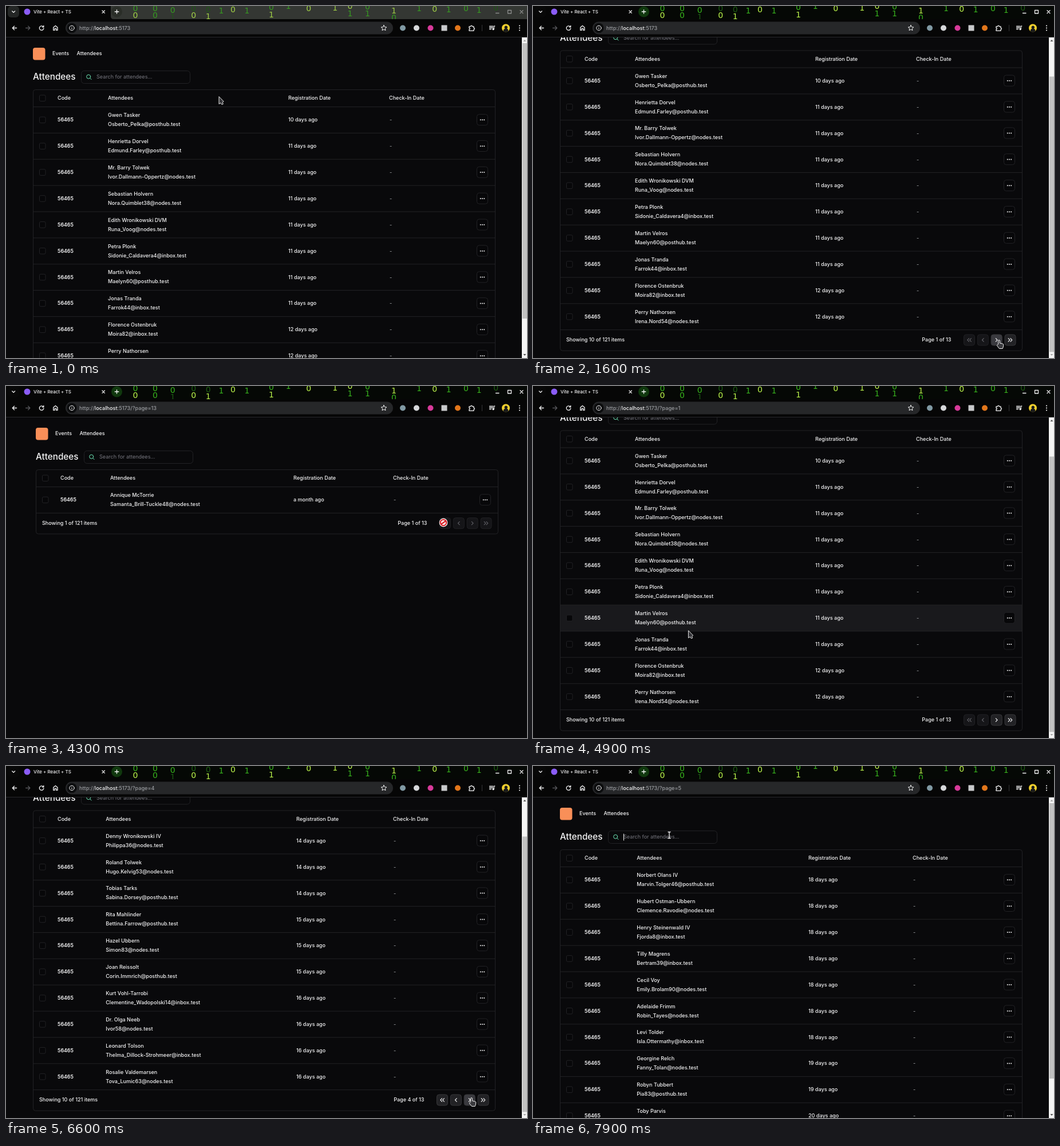
Write an HTML page that moves like this. It is 910 by 616 pixels and loops after 8000 ms.

```html
<!DOCTYPE html>
<html lang="en">
<head>
<meta charset="utf-8">
<title>Attendees</title>
<style>
  html, body { margin: 0; width: 100%; height: 100%; overflow: hidden; background: #09090b; }
  svg { display: block; width: 910px; height: 616px; font: 500 9.05px Inter, sans-serif; }
  text { fill: #f4f4f5; white-space: pre; }
  .line { fill: none; stroke: #f4f4f5; stroke-width: 1.3; stroke-linecap: round; stroke-linejoin: round; }
  .thin { stroke-width: 1; }
  .rule { stroke: #222225; fill: none; }
  .box { fill: #070709; stroke: #222225; }
  .muted { fill: #77777f; }
  .grey { fill: #9a9ca0; }
  .code { font-weight: 600; font-size: 8.8px; }
  .btn rect { fill: #222225; stroke: #38383b; }
  .btn.hot rect { fill: #3a3a3f; }
  .btn.off rect { fill: #151518; stroke: #212124; }
  .btn.off path { stroke: #626268; }
  #strip { fill: #050805; }
  #rain { font: 400 14px "DejaVu Sans", sans-serif; text-anchor: middle; }
  .idle #strip { fill: #343733; }
  .idle #rain { opacity: .8; }
  .idle #win { opacity: .45; }
  .idle #plus circle { fill: #2a2e28; }
  .idle #menu { fill: #242625; }
  #plus circle { fill: #10380e; }
  #menu { fill: #080808; }
</style>
</head>
<body>
<svg viewBox="0 0 910 616" id="stage">
  <rect width="910" height="616" fill="#09090b"/>
  <g id="shell">
    <rect x="47" y="73" width="21.5" height="21.5" rx="4" fill="#f98f58"/>
    <text x="81" y="86.4">Events</text>
    <text x="123.5" y="86.4">Attendees</text>
    <text x="47" y="129.4" font-size="15.3">Attendees</text>
    <rect class="rule" x="131.5" y="113.5" width="190" height="22" rx="5"/>
    <g class="line thin" style="stroke:#6ee7b7"><circle cx="144.2" cy="123.7" r="3.5"/><path d="M146.9 126.4l2.2 2.2"/></g>
    <text class="muted" x="158" y="127.2" font-weight="400">Search for attendees...</text>
    <path id="caret" d="M158.5 118.5v12" stroke="#f4f4f5"/>
    <rect id="hover" x="47.5" width="807" height="45.87" fill="#19191c"/>
    <g id="tables"></g>
    <g id="pager"></g>
  </g>
  <g id="bar">
    <rect x="901" y="55" width="9" height="561" fill="#f4f4f4"/>
    <rect id="thumb" x="902" width="8" height="482" fill="#c1c1c1"/>
    <path id="up" d="M903.5 62h5l-2.5-3z"/>
    <path id="down" d="M903.5 609h5l-2.5 3z"/>
  </g>

  <rect id="strip" width="910" height="24"/>
  <g id="rain"></g>
  <path d="M0 23.5V0H183V18q0 5 5 5H910V54.5H0z" fill="#060606"/>
  <rect y="54" width="910" height="1" fill="#29292b"/>
  <rect id="menu" x="3" width="20" height="20" rx="6"/>
  <path class="line" d="M10.8 9l2.4 2.4L15.6 9"/>
  <circle cx="37" cy="10" r="5.5" fill="#8b5cf6"/>
  <text x="48" y="13" font-size="7.95">Vite + React + TS</text>
  <path class="line" d="M168 8l4.4 4.4m0-4.4L168 12.4"/>
  <g id="plus"><circle cx="193.5" cy="10" r="9.5"/><path class="line" d="M190.2 10h6.6M193.5 6.7v6.6"/></g>
  <path id="win" class="line" d="M855.5 12.5h5.5M876.5 7.5h6v5.5h-6zM898 7.8l5 5m0-5l-5 5"/>

  <g class="line">
    <path d="M18.6 38.5H11.5M14.5 35.3l-3.2 3.2 3.2 3.2"/>
    <path style="stroke:#55565a" d="M34.6 38.5h7M38.7 35.3l3.2 3.2-3.2 3.2"/>
    <path d="M65.2 36.4a3.8 3.8 0 1 0 .7 2.6M65.8 34.4v2.4h-2.4"/>
    <path d="M82.8 37.6l3.6-3 3.6 3v4.8h-2.3v-3h-2.6v3h-2.3z"/>
  </g>
  <rect x="104" y="27.5" width="572" height="22" rx="11" fill="#262729"/>
  <circle cx="115" cy="38.5" r="8.7" fill="#0c0d0e"/>
  <g class="line thin"><circle cx="115" cy="38.5" r="4.2"/><path d="M115 38.3v2M115 36.4v.1"/></g>
  <text x="128" y="41.7" font-size="9.15" class="grey">http://<tspan fill="#f4f4f5">localhost</tspan>:5173<tspan id="query"></tspan></text>
  <path class="line thin" d="M660 33.6l1.4 3.1 3.4.4-2.5 2.3.7 3.3-3-1.7-3 1.7.7-3.3-2.5-2.3 3.4-.4z"/>
  <circle cx="693" cy="38.5" r="5" fill="#8099a3"/>
  <circle cx="717" cy="38.5" r="5" fill="#d6d8da"/>
  <circle cx="741.5" cy="38.5" r="5" fill="#d83a9a"/>
  <rect x="760.5" y="33.5" width="10" height="10" fill="#c9cacc"/>
  <circle cx="789" cy="38.5" r="5" fill="#e2761b"/>
  <path class="line" d="M809 35.8h2.6a1.4 1.4 0 0 1 2.8 0h2.6v2.5a1.4 1.4 0 0 1 0 2.8v2.2h-8v-2.3a1.3 1.3 0 0 0 0-2.6z"/>
  <path d="M831.5 33v11" stroke="#333437"/>
  <path class="line" d="M844.5 35.5h6M844.5 38h6M844.5 40.5h3M852.3 40.5v-5.4h1.6"/><circle cx="851" cy="40.7" r="1.6" fill="#f4f4f5"/>
  <circle cx="873" cy="38.5" r="7" fill="#f0cf2e"/>
  <path d="M868.6 44q.2-4 3.2-4.6a2.6 2.6 0 1 1 3 0q2.6.7 2.7 4.4a7 7 0 0 1-8.9.2z" fill="#191a1c"/>
  <path d="M897 34.5v8.1" stroke="#f4f4f5" stroke-width="2.2" stroke-linecap="round" stroke-dasharray="0 4"/>

  <g id="cursor">
    <path id="arrow" d="M0 0V13L3 11l2 3 2.3-1-1.2-3L8.2 8.5z" fill="#343438" stroke="#e8e8e8" stroke-linejoin="round"/>
    <path id="hand" d="M-1.4 7V1a1.4 1.4 0 0 1 2.8 0V5l5 1.1q1.6.4 1.4 2l-.6 4-1 2.4H.4L-3.4 9.6q-.5-1.4.6-1.7z" fill="#3a3a3e" stroke="#f2f2f2" stroke-linejoin="round"/>
    <path id="beam" class="line" d="M-2-5.5h1.4L0-5l.6-.5H2M0-5V5M-2 5.5h1.4L0 5l.6.5H2"/>
    <g id="stop"><circle r="7.4" fill="#fff"/><path d="M5.2 0A5.2 5.2 0 1 1-5.2 0 5.2 5.2 0 1 1 5.2 0M-3.8 2.8L3.8-2.8" fill="none" stroke="#d8262c" stroke-width="2.3"/></g>
  </g>
</svg>
<script>
const LOOP = 8000, TICK = 100, TOP = 176.5, ROW = 45.87, MAX = 68.5;
const $ = id => document.getElementById(id);
const label = (x, y, s, attrs = '') => `<text x="${x}" y="${y + 3.3}" ${attrs}>${s}</text>`;
const show = (id, on) => { $(id).style.display = on ? '' : 'none'; };

// Each row: name, mailbox, domain key
const domains = { h: 'posthub.test', y: 'nodes.test', g: 'inbox.test' };
const parse = s => s.trim().split('\n').map(l => l.trim().split('|'));
const rows = {
  1: parse(`Gwen Tasker|Osberto_Pelka|h
    Henrietta Dorvel|Edmund.Farley|h
    Mr. Barry Tolwek|Ivor.Dallmann-Oppertz|y
    Sebastian Holvern|Nora.Quimblet38|y
    Edith Wronikowski DVM|Runa_Voog|y
    Petra Plonk|Sidonie_Caldavera4|g
    Martin Velros|Maelyn60|h
    Jonas Tranda|Farrok44|g
    Florence Ostenbruk|Moira82|g
    Perry Nathorsen|Irena.Nord54|y`),
  4: parse(`Denny Wronikowski IV|Philippa36|y
    Roland Tolwek|Hugo.Kelvig53|y
    Tobias Tarks|Sabina.Dorsey|h
    Rita Mahlinder|Bettina.Farrow|h
    Hazel Ubbern|Simon83|y
    Joan Reissolt|Corin.Immrich|h
    Kurt Vohl-Tarrobi|Clementine_Wadopolski14|g
    Dr. Olga Neeb|Ivor58|y
    Leonard Tolson|Thelma_Dillock-Strohmeer|g
    Rosalie Valdemarsen|Tova_Lumic63|y`),
  5: parse(`Norbert Olans IV|Marvin.Tolger46|h
    Hubert Ostman-Ubbern|Clemence.Ravodie|y
    Henry Steinenwald IV|Fjorda8|g
    Tilly Magrens|Bertram39|g
    Cecil Voy|Emily.Brolam90|y
    Adelaide Frimm|Robin_Tayes|y
    Levi Tolder|Isla.Ottermathy|g
    Georgine Relch|Fanny_Tolan|y
    Robyn Tubbert|Pia83|h
    Toby Parvis|Odin_Brask31|y`),
  13: parse('Annique McTorrie|Samanta_Brill-Tuckle48|y')
};
// In-between pages recombine names and mailboxes
const mix = (a, b) => a.map((r, i) => {
  const other = b[9 - i];
  return [r[0].split(' ').slice(0, -1).join(' ') + ' ' + other[0].split(' ')[1], other[1], r[2]];
});
rows[2] = mix(rows[1], rows[5]);
rows[3] = mix(rows[4], rows[1]);

// Per page: column shift, age of the first row, rows where the age steps up a day
const layout = {
  1: [0, 10, 1, 8], 2: [3, 12, 5, 9], 3: [10, 13, 4, 8],
  4: [14, 14, 3, 6], 5: [-12, 18, 7, 9], 13: [4]
};
const checkbox = y => `<rect class="box" x="58.5" y="${y - 5}" width="10.5" height="10.5" rx="2"/>`;

function table(page) {
  const [shift, age, ...bumps] = layout[page], list = rows[page], end = TOP + list.length * ROW;
  const who = 178 - shift * .27, reg = 493 + shift, chk = 669 + shift / 2;
  let s = `<rect class="rule" x="47.5" y="146.5" width="807" height="${end - 110}" rx="4"/>` + checkbox(161) +
    label(90, 161, 'Code') + label(who, 161, 'Attendees') +
    label(reg, 161, 'Registration Date') + label(chk, 161, 'Check-In Date');
  list.forEach(([name, box, dom], i) => {
    const y = TOP + i * ROW, mid = y + 22.6;
    const days = age + bumps.filter(b => i >= b).length;
    s += `<path class="rule" d="M47.5 ${y}h807"/>` + checkbox(mid) +
      label(90, mid, '56465', 'class="code"') + label(who, y + 14.4, name) +
      label(who, y + 30.4, box + '@' + domains[dom]) +
      label(reg, mid, days ? days + ' days ago' : 'a month ago') +
      label(chk + 1, mid, '-', 'class="grey"') +
      `<rect class="box" x="822.5" y="${mid - 9.5}" width="19" height="19" rx="4"/>` +
      `<path class="line" style="stroke-width:2" stroke-dasharray="0 3.2" d="M828.8 ${mid + .2}h6.5"/>`;
  });
  return `<g id="page${page}">${s}<path class="rule" d="M47.5 ${end}h807"/>` +
    label(58, end + 17.4, `Showing ${list.length} of 121 items`) + '</g>';
}
$('tables').innerHTML = Object.keys(rows).map(table).join('');

const chevron = (x, dir) => `M${x - dir * 1.4} -2.8l${dir * 2.8} 2.8l${-dir * 2.8} 2.8`;
const icons = [chevron(-1.8, -1) + chevron(2, -1), chevron(0, -1), chevron(0, 1), chevron(-2, 1) + chevron(1.8, 1)];
const btnX = i => 762 + 23.85 * i;
$('pager').innerHTML = label(730.5, 17.4, '', 'id="count" text-anchor="end"') + icons.map((d, i) =>
  `<g class="btn" id="btn${i}" transform="translate(${btnX(i)} 17.8)"><rect x="-9.5" y="-9.5" width="19" height="19" rx="4"/>` +
  `<path class="line" style="stroke-width:1.1" d="${d}"/></g>`).join('');

// Digit columns in the title strip
let seed = 11;
const random = () => (seed = seed * 16807 % 2147483647) / 2147483647;
const pick = list => list[Math.floor(random() * list.length)];
let rain = '';
for (let x = 226; x < 860; x += 20 + random() * 28) {
  const pair = random() < .6;
  for (let y = random() * 8; y < 22; y += pair ? 12.5 : 22)
    rain += `<text x="${x}" y="${y + 5}" style="fill:${pick(['#1c5a12', '#37b01c', '#37b01c', '#b9f24a'])}">${pick('01')}</text>`;
}
$('rain').innerHTML = rain;

// When each page of data arrives
const arrivals = [[0, 1], [2000, 2], [2200, 3], [3000, 13], [4400, 1], [6100, 2], [6300, 3], [6500, 4], [6800, 5]];
// Moves: start, end, then where to
const scrolls = [[300, 800, MAX], [3000, 3000, 0], [4500, 4900, MAX], [6900, 7400, 0]];
const hops = [[100, 900, 560, 430], [900, 1400, 814, 585], [2300, 2400, 834, 585], [3000, 3000, 143, 160.5],
  [3200, 4100, 764, 239], [4400, 5000, 232, 443], [5100, 5400, 803, 586], [6000, 6100, 813, 581], [6700, 7600, 238, 121]];

function at(moves, from, t) {
  return moves.reduce((pos, [start, end, ...to]) => {
    if (t < start) return pos;
    const u = t >= end ? 1 : (t - start) / (end - start), e = u * u * (3 - 2 * u);
    return pos.map((v, i) => v + (to[i] - v) * e);
  }, from);
}
const pointer = t => at(hops, [372, 158.5], t);

function render(t) {
  const data = arrivals.filter(a => a[0] <= t).pop()[1];
  const loading = t >= 4200 && t < 4400, page = loading ? 1 : data;
  const [scroll] = at(scrolls, [0], t), [x, y] = pointer(t);
  const short = data === 13, dx = short ? 5 : 0, count = rows[data].length, end = TOP + count * ROW;

  $('stage').classList.toggle('idle', t < 1000);
  $('shell').setAttribute('transform', `translate(${dx} ${-scroll})`);
  for (const p in rows) show('page' + p, +p === data);
  $('query').textContent = t < 2000 ? '' : '/?page=' + data;
  $('pager').setAttribute('transform', `translate(0 ${end})`);
  $('count').textContent = `Page ${page} of 13`;

  const over = icons.findIndex((_, i) => Math.hypot(x - dx - btnX(i), y + scroll - end - 17.8) < 11);
  const off = i => loading || page === (i < 2 ? 1 : 13);
  icons.forEach((_, i) => {
    $('btn' + i).classList.toggle('off', off(i));
    $('btn' + i).classList.toggle('hot', !off(i) && i === over);
  });

  // Row highlight trails the pointer by one tick
  const [hx, hy] = pointer(t - TICK), row = Math.floor((hy + scroll - TOP) / ROW);
  show('hover', row >= 0 && row < count && hx > 47 && hx < 855);
  $('hover').setAttribute('y', TOP + row * ROW);

  show('bar', !short);
  $('thumb').setAttribute('y', 65 + scroll * 58.5 / MAX);
  $('up').setAttribute('fill', scroll > 0 ? '#505050' : '#a3a3a3');
  $('down').setAttribute('fill', scroll < MAX ? '#505050' : '#a3a3a3');

  const field = x > 131 && x < 322 && y > 113 && y < 136 && scroll === 0;
  const kind = over >= 0 ? (off(over) ? 'stop' : 'hand') : field ? 'beam' : 'arrow';
  ['arrow', 'hand', 'beam', 'stop'].forEach(k => show(k, k === kind));
  $('cursor').setAttribute('transform', `translate(${x} ${y})`);
  show('caret', t >= 7700);
}

const start = performance.now();
let shown = -1;
function frame() {
  const t = Math.floor((performance.now() - start) % LOOP / TICK) * TICK;
  if (t !== shown) render(shown = t);
  requestAnimationFrame(frame);
}
frame();
</script>
</body>
</html>
```
